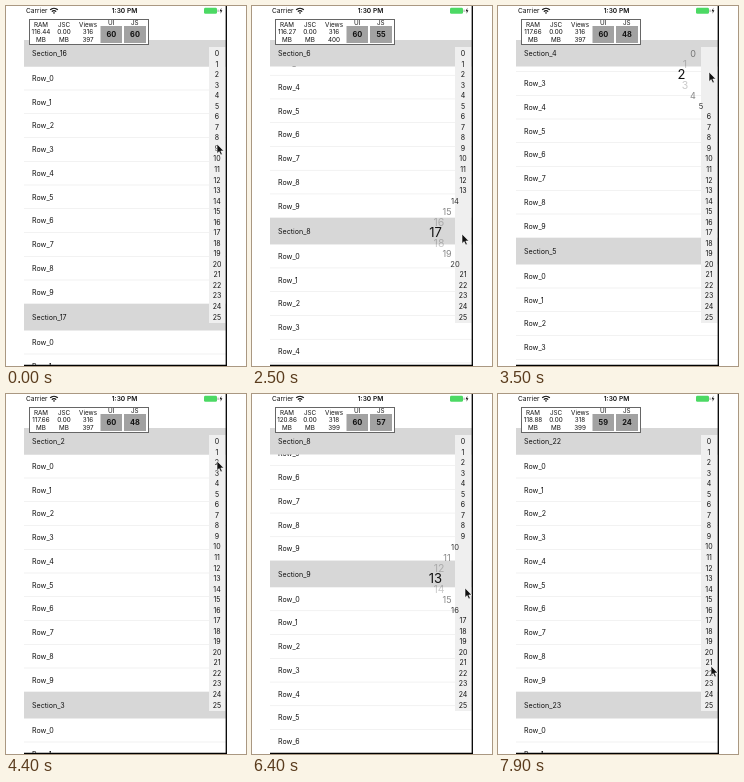
An HTML page that plays this animation: 240x360 px, repeating every 8000 ms.

```html
<!DOCTYPE html>
<html lang="en">
<head>
<meta charset="utf-8">
<title>Section list with index</title>
<style>
html, body { margin: 0; width: 100%; height: 100%; overflow: hidden; background: #fff; }
svg { display: block; width: 240px; height: 360px; font: 7.1px Inter, Roboto, sans-serif; fill: #111; }
.mid { text-anchor: middle; }
.status { font-size: 6.6px; }
.panel { font-size: 6.3px; }
.fps { font-size: 7.4px; font-weight: 700; }
</style>
</head>
<body>
<svg viewBox="0 0 240 360">
  <clipPath id="view"><rect x="18" y="34" width="202" height="326"/></clipPath>
  <g clip-path="url(#view)">
    <g id="list"></g>
    <g id="sticky"></g>
  </g>
  <rect x="203" y="41" width="16.5" height="276" fill="#efefef"/>
  <g id="index" class="mid"></g>

  <g class="status">
    <text x="20" y="7.3">Carrier</text>
    <text x="118.5" y="7.3" class="mid" font-weight="600">1:30 PM</text>
    <g fill="none" stroke="#111" stroke-width="1.2">
      <path d="M44.2 3.8a5.6 5.6 0 0 1 7.6 0M45.8 5.6a3.3 3.3 0 0 1 4.4 0"/>
    </g>
    <path d="M46.9 6.8a1.7 1.7 0 0 1 2.2 0L48 8z"/>
    <rect x="198" y="1.8" width="13" height="6" rx="1.4" fill="#4cd964"/>
    <rect x="211.6" y="3.6" width=".9" height="2.4" fill="#999"/>
    <path d="M215.4 1.8l-1.8 3.4h1.3l-.4 2.6 1.9-3.5h-1.3z"/>
  </g>

  <g id="panel" class="panel mid">
    <rect x="23.5" y="13.5" width="119" height="25" fill="#fff" stroke="#666"/>
    <rect x="94.5" y="20" width="21.5" height="17" fill="#a2a2a2"/>
    <rect x="118" y="20" width="22" height="17" fill="#a2a2a2"/>
  </g>
  <path d="M220.3 0V360M18 359.5H221" stroke="#000" stroke-width="1.3"/>
  <path id="cursor" d="M0 0V9.6L2.2 7.6 3.7 11 5.3 10.3 3.8 7H6.8Z" stroke="#fff" stroke-width=".6"/>
</svg>
<script>
const LOOP = 8000, STEP = 100;
const TOP = 34, HEAD = 26.5, ROW = 23.75, SECTION = HEAD + 10 * ROW;
const COUNT = 26, INDEX_TOP = 47.5, INDEX_GAP = 10.54;

// Index look by distance from the touched number: shift, font size, opacity
const WAVE = [[27.5, 13, 1], [24, 10.5, .22], [16, 9, .5], [8, 7.6, .85]];
const REST = [0, 7, 1];

const touches = [[800, 1100], [2100, 3900], [5200, 7600]];

const pointer = [
  [0, 211, 138], [1300, 211, 138], [1400, 210, 133], [1600, 209, 110], [1800, 209, 92],
  [2000, 209, 92], [2200, 209, 125], [2400, 210, 222], [2500, 210, 228], [2700, 211, 240],
  [2800, 211, 215], [3000, 211, 111], [3100, 212, 93], [3300, 211, 66], [4300, 211, 66],
  [4400, 211, 67], [5000, 213, 173], [5200, 213, 173], [5500, 213, 262], [5700, 213, 250],
  [6000, 213, 125], [6100, 213, 120], [6300, 213, 184], [6400, 213, 194], [6800, 213, 278],
  [7500, 213, 278], [7700, 213, 272]
];

// Scroll position measured in sections
const scroll = [
  [0, 16], [800, 15.9], [1000, 13.2], [1200, 9.8], [1300, 9.1], [1400, 9], [2100, 9],
  [2200, 8.2], [2300, 7], [2400, 6.5], [2500, 7.326], [2700, 11], [2800, 12.6],
  [2900, 13.2], [3000, 12.6], [3100, 11.417], [3400, 5.5], [3600, 3], [3700, 2.3],
  [3800, 2], [5200, 2], [5400, 5], [5600, 10], [5800, 14], [5900, 14], [6000, 12],
  [6200, 8.5], [6300, 8.2], [6400, 8.497], [6600, 11], [6800, 15], [7000, 18.5],
  [7200, 21], [7400, 21.9], [7500, 22]
];

const ram = [[0, "116.44"], [1200, "117.54"], [2200, "116.27"], [3500, "117.66"],
  [4900, "117.98"], [5600, "119.42"], [6200, "120.86"], [7200, "118.88"]];
const views = [[0, "316", "397"], [2200, "316", "400"], [3500, "316", "397"], [5600, "318", "399"]];
const ui = [[0, "60"], [7300, "59"]];
const js = [[0, "60"], [1700, "59"], [1800, "60"], [2400, "55"], [2800, "51"], [3100, "48"],
  [4900, "52"], [5500, "46"], [6300, "57"], [6900, "49"], [7300, "38"], [7600, "29"], [7900, "24"]];

const $ = id => document.getElementById(id);

function add(parent, tag, attrs, content = "") {
  const el = document.createElementNS("http://www.w3.org/2000/svg", tag);
  for (const name in attrs) el.setAttribute(name, attrs[name]);
  el.textContent = content;
  return parent.appendChild(el);
}

const label = (parent, x, y, content, cls = "") => add(parent, "text", { x, y, class: cls }, content);
const held = (keys, t) => keys.filter(k => k[0] <= t).pop();

function tween(keys, t, field = 1) {
  const next = keys.findIndex(k => k[0] > t);
  if (next < 0) return keys[keys.length - 1][field];
  if (next === 0) return keys[0][field];
  const a = keys[next - 1], b = keys[next];
  return a[field] + (b[field] - a[field]) * (t - a[0]) / (b[0] - a[0]);
}

function addHeader(parent, y, name) {
  add(parent, "rect", { x: 18, y, width: 202, height: HEAD, fill: "#d7d7d7" });
  return label(parent, 26, y + 15.8, name);
}

for (let s = 0; s < COUNT; s++) {
  const y = TOP + s * SECTION;
  addHeader($("list"), y, "Section_" + s);
  for (let r = 0; r < 10; r++) {
    const rowY = y + HEAD + r * ROW;
    label($("list"), 26, rowY + 14.4, "Row_" + r);
    add($("list"), "rect", { x: 18, y: rowY + ROW - .5, width: 202, height: .5, fill: "#e4e4e4" });
  }
}
const stickyName = addHeader($("sticky"), TOP, "");

const numbers = Array.from({ length: COUNT }, (_, i) => label($("index"), 211, 0, i));

const panel = $("panel");
const lines = (x, texts) => texts.map((s, i) => label(panel, x, 20.6 + i * 7.7, s));
const ramLabel = lines(35, ["RAM", "", "MB"])[1];
lines(58, ["JSC", "0.00", "MB"]);
const viewLabels = lines(82, ["Views", "", ""]).slice(1);
label(panel, 105.3, 19.2, "UI");
label(panel, 128.7, 19.2, "JS");
const uiLabel = label(panel, 105.3, 31.2, "", "fps");
const jsLabel = label(panel, 129, 31.2, "", "fps");

function drawList(t) {
  const pos = tween(scroll, t);
  const section = Math.floor(pos);
  const shown = Math.min(section, Math.floor(tween(scroll, Math.max(0, t - STEP))));
  const nextTop = (section + 1 - pos) * SECTION;
  const push = shown === section ? Math.min(0, nextTop - HEAD) : 0;
  $("list").setAttribute("transform", `translate(0 ${-pos * SECTION})`);
  $("sticky").setAttribute("transform", `translate(0 ${push})`);
  stickyName.textContent = "Section_" + shown;
}

function drawIndex(t) {
  const touched = touches.some(([from, to]) => t >= from && t < to);
  const active = Math.round((tween(pointer, t - STEP, 2) - INDEX_TOP) / INDEX_GAP);
  numbers.forEach((el, i) => {
    const [shift, size, opacity] = touched && WAVE[Math.abs(i - active)] || REST;
    el.setAttribute("x", 211 - shift);
    el.setAttribute("y", INDEX_TOP + i * INDEX_GAP + size * .36);
    el.style.fontSize = size + "px";
    el.style.opacity = opacity;
  });
}

function drawPanel(t) {
  ramLabel.textContent = held(ram, t)[1];
  viewLabels.forEach((el, i) => el.textContent = held(views, t)[i + 1]);
  uiLabel.textContent = held(ui, t)[1];
  jsLabel.textContent = held(js, t)[1];
}

function draw(now) {
  const t = Math.floor(now % LOOP / STEP) * STEP;
  drawList(t);
  drawIndex(t);
  drawPanel(t);
  $("cursor").setAttribute("transform", `translate(${tween(pointer, t)} ${tween(pointer, t, 2)})`);
}

let start;
function tick(now) {
  start ??= now;
  draw(Math.max(0, now - start));
  requestAnimationFrame(tick);
}
draw(0);
requestAnimationFrame(tick);
</script>
</body>
</html>
```
